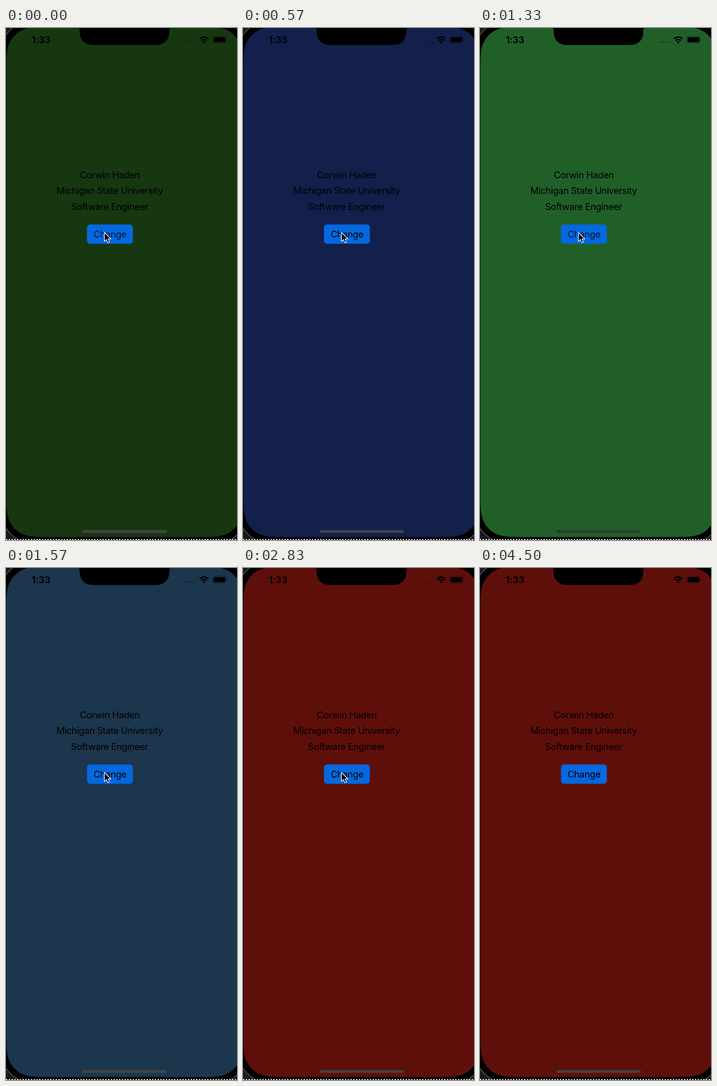
Animation, 503 px wide and 1114 px high, one loop 4.53 s. Source, as an HTML page:

```html
<!DOCTYPE html>
<html lang="en">
<head>
<meta charset="utf-8">
<title>Colour change button</title>
<style>
  html, body { margin: 0; width: 100%; height: 100%; overflow: hidden; background: #000; }
  svg { display: block; width: 100vw; height: 100vh; }

  text { font: 400 20.3px Inter, Roboto, sans-serif; font-optical-sizing: none; letter-spacing: -.025em; }
  .label { text-anchor: middle; }
  .clock { font-size: 20.6px; font-weight: 600; letter-spacing: -.01em; }

  .screen, .caption, .home, .pointer { animation: 4530ms linear infinite; }
  .screen { animation-name: recolour; animation-timing-function: step-end; }
  .caption { animation-name: press; }
  .home { animation-name: adapt; }
  .pointer { animation-name: leave; animation-timing-function: ease-in; }

  @keyframes recolour {
    0% { fill: #173711; }
    2.65% { fill: #12204b; }
    20.97% { fill: #206028; }
    30.91% { fill: #1c364e; }
    41.28% { fill: #174428; }
    59.6%, 100% { fill: #5f0f0a; }
  }

  /* The caption dims while the button is held and recovers on release. */
  @keyframes press {
    0%, 2.65% { opacity: .8; }
    5%, 18% { opacity: 1; }
    18.4%, 20.97% { opacity: .8; }
    23%, 27.8% { opacity: 1; }
    28.2%, 30.91% { opacity: .8; }
    33%, 38.4% { opacity: 1; }
    38.8%, 41.28% { opacity: .8; }
    43.5%, 56.7% { opacity: 1; }
    57.1%, 59.6% { opacity: .8; }
    62%, 100% { opacity: 1; }
  }

  @keyframes adapt {
    0%, 20.97% { fill: #444; }
    26%, 30.91% { fill: #343434; }
    34%, 100% { fill: #444; }
  }

  @keyframes leave {
    0%, 79.5% { transform: none; }
    89.4%, 100% { transform: translate(300px, 110px); }
  }
</style>
</head>
<body>
<svg viewBox="0 0 503 1114" preserveAspectRatio="none">
  <!-- Phone body -->
  <rect width="503" height="1114" fill="#191919"/>
  <rect x="-19" y="-23" width="554" height="1150" rx="95" fill="#000" stroke="#4b4b4d" stroke-width="2"/>
  <path class="screen" id="screen"/>
  <path d="M156-1Q160.5 0 160.5 5V9C160.5 26 172 37 189 37H327C344 37 355.5 26 355.5 9V5Q355.5 0 360-1Z"/>

  <!-- Status bar -->
  <text class="clock" x="56" y="33">1:33</text>
  <path d="M392 30.5h20" fill="none" stroke="#000" stroke-opacity=".25" stroke-width="4"
        stroke-linecap="round" stroke-dasharray="0 6.6"/>
  <g fill="none" stroke="#000" stroke-width="3.2">
    <path d="M422.3 23.5a13.2 13.2 0 0 1 18.4 0"/>
    <path d="M425.8 27.3a8.2 8.2 0 0 1 11.4 0"/>
  </g>
  <path d="M428.2 30.2a4.8 4.8 0 0 1 6.6 0L431.5 33.5Z"/>
  <rect x="450" y="18" width="29.5" height="15" rx="4.3" fill="none" stroke="#000"
        stroke-opacity=".35" stroke-width="1.3"/>
  <rect x="452" y="20" width="25.5" height="11" rx="2.4"/>
  <path d="M481 23q2 2.5 0 5z" opacity=".5"/>

  <!-- Profile -->
  <text class="label" x="226" y="326.5">Corwin Haden</text>
  <text class="label" x="225.5" y="361">Michigan State University</text>
  <text class="label" x="225.5" y="396">Software Engineer</text>
  <rect x="176.3" y="427.5" width="100" height="42" rx="7" fill="#0568df"/>
  <text class="label caption" x="226.5" y="456.2">Change</text>

  <rect class="home" x="166.5" y="1092.5" width="183.5" height="6" rx="3"/>
  <path d="M0 1113h503" stroke="#fff" stroke-width="2" stroke-dasharray="3"/>

  <path class="pointer" d="M214.3 445V464.2l4.3-4 3.3 7 3.4-1.5-3.2-6.8h6.2Z"
        stroke="#fff" stroke-width="1.4" stroke-linejoin="round"/>
</svg>
<script>
  // Rounded rectangle whose corners ease into the straight edges.
  function smoothRect(left, top, right, bottom, radius) {
    const corner = [[0, 1.529], [0, 1.088], [0, .868], [.075, .631], [.169, .373],
                    [.373, .169], [.631, .075], [.868, 0], [1.088, 0], [1.529, 0]];
    const place = (x, sx, y, sy, reverse) => {
      const points = corner.map(([u, v]) => `${x + sx * u * radius} ${y + sy * v * radius}`);
      if (reverse) points.reverse();
      return points[0] + 'C' + points.slice(1).join(' ');
    };
    return 'M' + [
      place(left, 1, top, 1, false),
      place(right, -1, top, 1, true),
      place(right, -1, bottom, -1, false),
      place(left, 1, bottom, -1, true)
    ].join('L') + 'Z';
  }
  document.getElementById('screen').setAttribute('d', smoothRect(1, -2.5, 515, 1107.5, 62));
</script>
</body>
</html>
```
